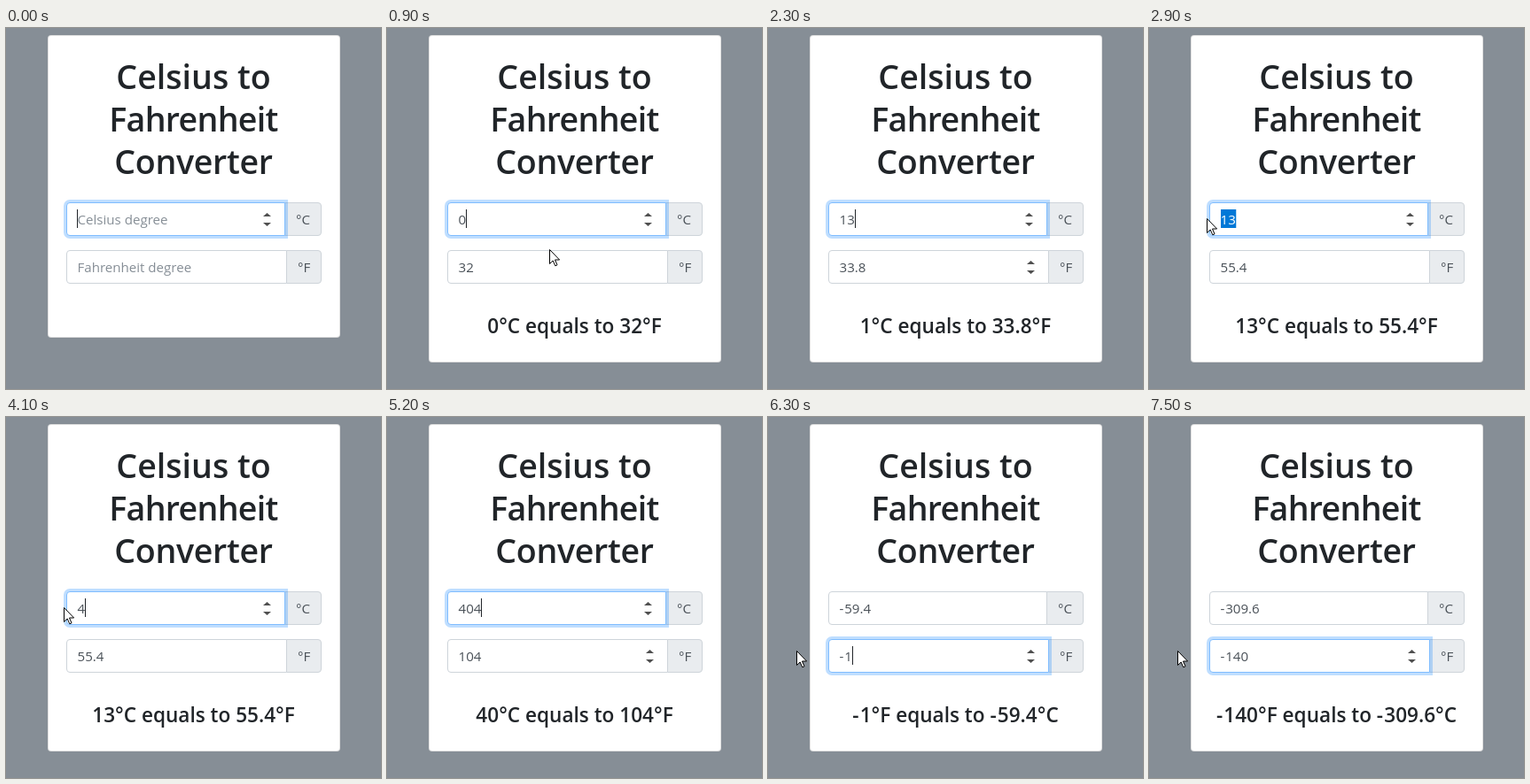
An HTML page that plays this animation: 423x408 px, repeating every 8000 ms.

```html
<!DOCTYPE html>
<html lang="en">
<head>
<meta charset="utf-8">
<title>Celsius to Fahrenheit Converter</title>
<style>
  html, body { margin: 0; width: 100%; height: 100%; overflow: hidden; background: #868e96; }
  div, svg { position: absolute; box-sizing: border-box; }
  #card { left: 47px; top: 8px; width: 330px; height: 342px; background: #fff; border: 1px solid rgba(0,0,0,.125); border-radius: 4px; }
  #card.tall { height: 370px; }
  .unit { height: 38px; background: #e9ecef; border: 1px solid #ced4da; border-radius: 0 4px 4px 0; }
  .field { left: 68px; height: 38px; background: #fff; border: 1px solid #ced4da; border-radius: 4px 0 0 4px; }
  .field.on { border-color: #80bdff; box-shadow: 0 0 0 3px rgba(0,123,255,.25); z-index: 1; }
  .rowC { top: 197px; }
  .rowF { top: 251px; }
  svg { left: 0; top: 0; z-index: 2; font-family: "Open Sans", "Noto Sans", sans-serif; }
  .title { font-size: 37.6px; font-weight: 600; text-anchor: middle; fill: #212529; }
  .body { font-size: 15.1px; fill: #495057; }
  .body.hint { fill: #868e96; }
  .body.picked { fill: #fff; }
  #result { font-size: 22.6px; font-weight: 600; text-anchor: middle; fill: #212529; }
  .dash { letter-spacing: .05em; }
  .spin { fill: #505050; }
</style>
</head>
<body>
<div id="card"></div>
<div class="unit rowC" style="left:314px;width:42px"></div>
<div class="unit rowF" style="left:316px;width:40px"></div>
<div class="field rowC" id="boxC" style="width:247px"></div>
<div class="field rowF" id="boxF" style="width:249px"></div>
<svg width="423" height="408" viewBox="0 0 423 408">
  <g class="title">
    <text x="211.5" y="69">Celsius to</text>
    <text x="211.5" y="117" letter-spacing="-.7">Fahrenheit</text>
    <text x="211.5" y="165" letter-spacing="-.3">Converter</text>
  </g>
  <rect id="pick" x="81" width="0" height="21" fill="#0078d7"/>
  <text class="body" id="textC" x="80.5" y="222"></text>
  <text class="body" id="textF" x="80.5" y="276"></text>
  <text class="body" x="327" y="222">°C</text>
  <text class="body" x="329" y="276">°F</text>
  <path class="spin" id="spinC" d="M290 213l4.5-4 4.5 4zM290 220h9l-4.5 4z"/>
  <path class="spin" id="spinF" d="M292 267l4.5-4 4.5 4zM292 274h9l-4.5 4z"/>
  <rect id="caret" width="1" height="21" fill="#212529"/>
  <text id="result" x="211.5" y="345"></text>
  <path id="arrow" d="M.5 .5V16.5L4.2 13L6.8 18.8L9 17.8L6.5 12H11.6Z" fill="#fff" stroke="#000"/>
</svg>
<script>
const LOOP = 8000;
const el = id => document.getElementById(id);
const show = (node, on) => { node.style.display = on ? '' : 'none'; };
const round1 = v => String(+v.toFixed(1));

// Results of converting the value in one field
const fromC = v => { const F = round1(v * 1.8 + 32); return { F, out: `${v}°C equals to ${F}°F` }; };
const fromF = v => { const C = round1((v - 32) * 1.8); return { C, out: `${v}°F equals to ${C}°C` }; };

// Each step: time, then what changes; hover means the pointer is over the lower field
const steps = [
  [0, { C: '', F: '', focus: 'C', picked: false, hover: false, out: '', mouse: null, caret: true }],
  [400, { C: '0' }],
  [500, fromC(0)],
  [800, { mouse: [181, 238] }],
  [900, { mouse: [183, 250] }],
  [1000, { mouse: null, hover: true }],
  [1200, { mouse: [150, 240], hover: false }],
  [1300, { mouse: null }],
  [1400, { picked: true }],
  [1700, { mouse: [66, 215] }],
  [1900, { C: '1', picked: false }],
  [2000, fromC(1)],
  [2100, { mouse: [100, 240] }],
  [2200, { mouse: null, hover: true }],
  [2300, { C: '13' }],
  [2400, fromC(13)],
  [2600, { mouse: [120, 240], hover: false }],
  [2700, { mouse: null }],
  [2800, { picked: true }],
  [2900, { mouse: [65, 215] }],
  [4100, { C: '4', picked: false }],
  [4200, fromC(4)],
  [4500, { C: '40' }],
  [4700, fromC(40)],
  [4800, { mouse: [90, 240] }],
  [4900, { mouse: null, hover: true }],
  [5200, { C: '404' }],
  [5300, fromC(404)],
  [5700, { focus: 'F' }],
  [5800, { picked: true }],
  [5900, { mouse: [38, 266], hover: false }],
  [6100, { F: '-', picked: false, mouse: [32, 264] }],
  [6200, { F: '-1' }],
  [6300, fromF(-1)],
  [6800, { F: '-14' }],
  [7000, { ...fromF(-14), F: '-140' }],
  [7100, fromF(-140)],
  [7500, { caret: false }]
];

const hints = { C: 'Celsius degree', F: 'Fahrenheit degree' };
const tops = { C: 205, F: 259 };
const write = (node, s) => { node.innerHTML = s.replace(/-/g, '<tspan class="dash">-</tspan>'); };
const caretX = s => Math.floor([...s].reduce((x, ch) => x + (ch === '-' ? 6.4 : 8.62), 80.95));

function draw(s) {
  for (const k of ['C', 'F']) {
    const text = el('text' + k), on = s.focus === k;
    write(text, s[k] || hints[k]);
    text.setAttribute('class', 'body' + (!s[k] ? ' hint' : on && s.picked ? ' picked' : ''));
    el('box' + k).classList.toggle('on', on);
    show(el('spin' + k), on || (k === 'F' && s.hover));
  }
  const pick = el('pick'), caret = el('caret');
  pick.setAttribute('y', tops[s.focus]);
  pick.setAttribute('width', s.picked ? el('text' + s.focus).getComputedTextLength() : 0);
  caret.setAttribute('x', caretX(s[s.focus]));
  caret.setAttribute('y', tops[s.focus]);
  show(caret, s.caret && !s.picked);
  write(el('result'), s.out);
  el('card').classList.toggle('tall', s.out !== '');
  show(el('arrow'), s.mouse);
  if (s.mouse) el('arrow').setAttribute('transform', `translate(${s.mouse})`);
}

let last = -1;
function tick() {
  const t = performance.now() % LOOP;
  const past = steps.filter(([at]) => at <= t);
  if (past.length !== last) {
    last = past.length;
    draw(Object.assign({}, ...past.map(([, change]) => change)));
  }
  requestAnimationFrame(tick);
}
tick();
</script>
</body>
</html>
```
